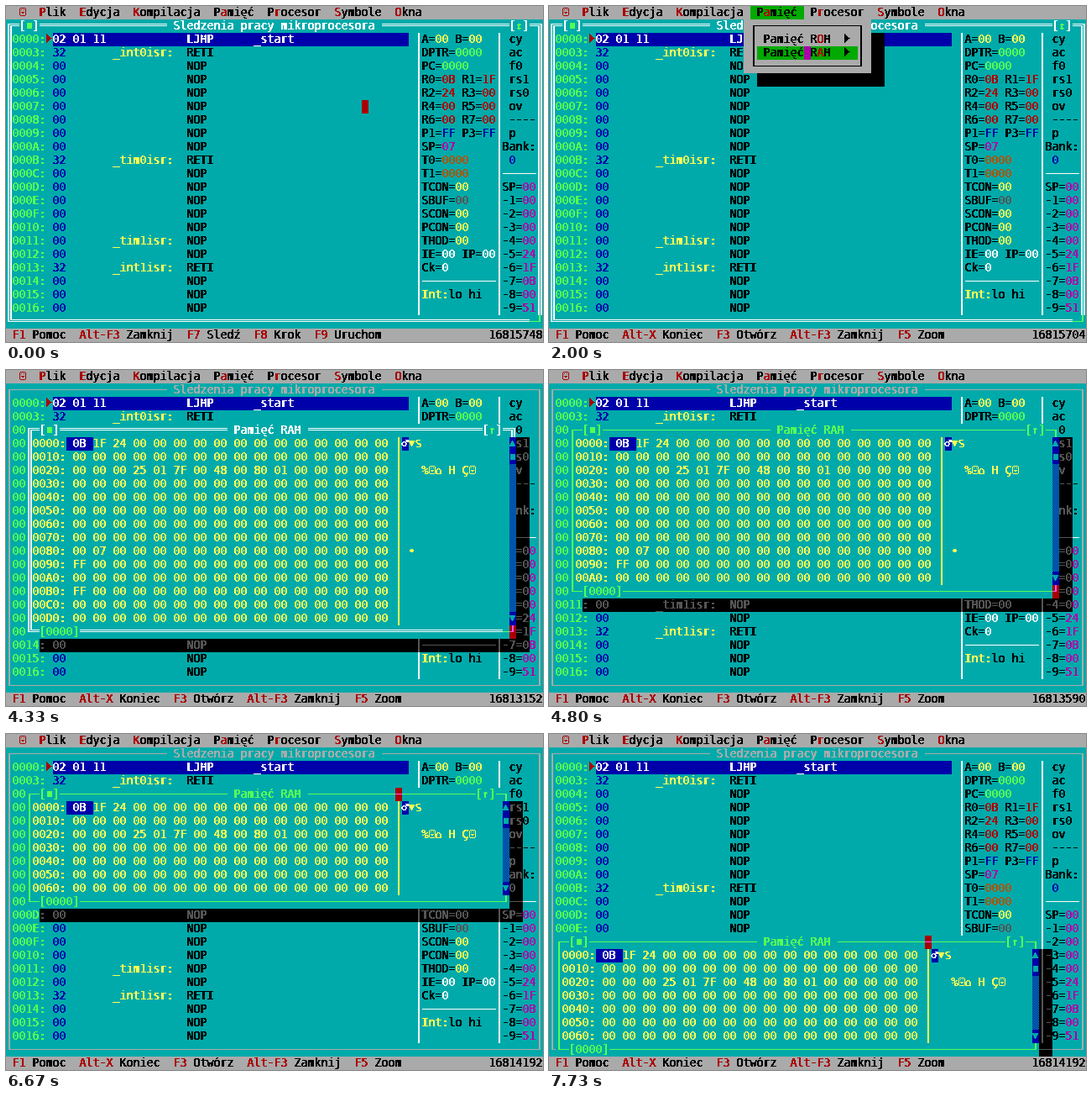
An HTML page with a canvas that plays this animation: 640 by 400 pixels, repeating every 8 s.

```html
<!DOCTYPE html>
<html lang="pl">
<head>
<meta charset="utf-8">
<title>Text-mode debugger</title>
<style>
html, body { margin: 0; width: 100%; height: 100%; overflow: hidden; background: #0aa; }
canvas { display: block; }
</style>
</head>
<body>
<canvas id="screen" width="640" height="400"></canvas>
<script>
const COLS = 80, ROWS = 25, CELL_W = 8, CELL_H = 16, LOOP = 8000, TICK = 1000 / 15;
const BLACK = 0, BLUE = 1, GREEN = 2, CYAN = 3, RED = 4, MAGENTA = 5, BROWN = 6, GREY = 7,
      DARK = 8, LIME = 10, YELLOW = 14, WHITE = 15;

const range = n => [...Array(n).keys()];
const hex = (n, digits) => n.toString(16).toUpperCase().padStart(digits, '0');

// Colour bits: intensity, red, green, blue
const PALETTE = range(16).map(c => {
  const channel = bit => (c >> bit & 1) * 170 + (c >> 3) * 85;
  return c === BROWN ? '#a50' : `rgb(${channel(2)},${channel(1)},${channel(0)})`;
});

// ---- Glyphs: lists of rectangles [x, y, w, h] inside a cell ----
const elbow = (x, y, right, down) => [
  right ? [x, y, CELL_W - x, 1] : [0, y, x + 2, 1],
  down ? [x, y, 2, CELL_H - y] : [x, 0, 2, y + 1]
];
const doubleElbow = (right, down) => [
  ...elbow(right ? 2 : 5, down ? 5 : 7, right, down),
  ...elbow(right ? 5 : 2, down ? 7 : 5, right, down)
];
const taper = i => 3 - Math.ceil(i / 2);
const zeroInset = i => Math.max(0, 2 - Math.min(i, 9 - i));

const glyphs = {
  '─': [[0, 7, 8, 1]],
  '│': [[3, 0, 2, 16]],
  '═': [5, 7].map(y => [0, y, 8, 1]),
  '║': [2, 5].map(x => [x, 0, 2, 16]),
  '■': [[1, 4, 6, 7]],
  '►': range(11).map(i => [0, 1 + i, Math.floor(7 - 1.2 * Math.abs(5 - i)), 1]),
  '▲': range(7).map(i => [taper(i), 4 + i, 7 - 2 * taper(i), 1]),
  '▼': range(7).map(i => [taper(i), 10 - i, 7 - 2 * taper(i), 1]),
  '▒': range(64).map(i => [i % 4 * 2 + 1 - (i >> 2) % 2, i >> 2, 1, 1]),
  '0': [[3, 6, 1, 2], ...range(10).flatMap(i =>
    [zeroInset(i), 5 - zeroInset(i)].map(x => [x, 2 + i, 2, 1]))],
  '☺': [...[2, 11].map(y => [1, y, 6, 1]), ...[0, 7].map(x => [x, 3, 1, 8]),
        ...[2, 5].map(x => [x, 4, 1, 1]), ...[0, 1].map(i => [2 + i, 7 + i, 4 - 2 * i, 1])]
};
[...'┌┐└┘'].forEach((ch, i) => { glyphs[ch] = elbow(3, 7, i % 2 === 0, i < 2); });
[...'╔╗╚╝'].forEach((ch, i) => { glyphs[ch] = doubleElbow(i % 2 === 0, i < 2); });

const scratch = document.createElement('canvas').getContext('2d', { willReadFrequently: true });
scratch.font = '13.3px "DejaVu Sans Mono", monospace';

// Letters come from the font, snapped to whole pixels with two-pixel-wide stems
function glyph(ch) {
  if (!glyphs[ch]) {
    scratch.clearRect(0, 0, CELL_W, CELL_H);
    scratch.fillText(ch, 0, 12);
    const { data } = scratch.getImageData(0, 0, CELL_W, CELL_H);
    glyphs[ch] = range(CELL_W * CELL_H)
      .filter(i => data[i * 4 + 3] > 135)
      .map(i => [i % CELL_W - 1, Math.floor(i / CELL_W), 2, 1]);
  }
  return glyphs[ch];
}

// ---- Text screen ----
const cells = range(COLS * ROWS).map(() => ({ ch: ' ', fg: BLACK, bg: CYAN }));
const cellAt = (x, y) => x >= 0 && x < COLS && y >= 0 && y < ROWS ? cells[y * COLS + x] : null;

// Text between tildes takes the "hot" colour
function put(x, y, text, fg, bg = CYAN, hot = fg) {
  text.split('~').forEach((part, i) => {
    for (const ch of part) {
      const cell = cellAt(x++, y);
      if (cell) Object.assign(cell, { ch, fg: i % 2 ? hot : fg, bg });
    }
  });
}

function box(x, y, w, h, double, fg, bg) {
  const [tl, hz, tr, vt, bl, br] = double ? '╔═╗║╚╝' : '┌─┐│└┘';
  put(x, y, tl + hz.repeat(w - 2) + tr, fg, bg);
  for (let r = 1; r < h - 1; r++) put(x, y + r, vt + ' '.repeat(w - 2) + vt, fg, bg);
  put(x, y + h - 1, bl + hz.repeat(w - 2) + br, fg, bg);
}

function shadow(x, y, w, h) {
  const dim = (cx, cy) => {
    const cell = cellAt(cx, cy);
    if (cell) Object.assign(cell, { fg: DARK, bg: BLACK });
  };
  for (let r = 1; r < h; r++) { dim(x + w, y + r); dim(x + w + 1, y + r); }
  for (let c = 2; c < w + 2; c++) dim(x + c, y + h);
}

function openWindow(x, y, w, h, title, zoomIcon, state) {
  const colour = { active: WHITE, passive: GREY, dragged: LIME }[state];
  box(x, y, w, h, state === 'active', colour, CYAN);
  put(x + Math.floor((w - title.length) / 2) - 1, y, ` ${title} `, colour);
  if (state === 'passive') return;
  put(x + 2, y, '[~■~]', colour, CYAN, LIME);
  put(x + w - 5, y, `[~${zoomIcon}~]`, colour, CYAN, LIME);
  put(x + w - 2, y + h - 1, '─┘', LIME);
}

function popup(x, y, w, items, selected) {
  const h = items.length + 2;
  for (let r = 0; r < h; r++) put(x, y + r, ' '.repeat(w), BLACK, GREY);
  box(x + 1, y, w - 2, h, false, BLACK, GREY);
  items.forEach((item, i) => {
    const bg = i === selected ? GREEN : GREY;
    put(x + 2, y + 1 + i, ' '.repeat(w - 4), BLACK, bg);
    put(x + 3, y + 1 + i, item, BLACK, bg, RED);
  });
  shadow(x, y, w, h);
}

// ---- Tracer window ----
const INTERRUPTS = { '0003': '_int0isr:', '000B': '_tim0isr:', '0011': '_tim1isr:', '0013': '_int1isr:' };
const REGISTERS = [
  ['A=00 B=00', YELLOW], ['DPTR=0000', LIME], ['PC=0000', LIME],
  ['R0=0B R1=1F', RED], ['R2=24 R3=00', RED], ['R4=00 R5=00', RED], ['R6=00 R7=00', RED],
  ['P1=FF P3=FF', BLUE], ['SP=07', MAGENTA], ['T0=0000', BROWN], ['T1=0000', BROWN],
  ['TCON=00', YELLOW], ['SBUF=00', DARK], ['SCON=00', YELLOW], ['PCON=00', YELLOW],
  ['TMOD=00', YELLOW], ['IE=00 IP=00', WHITE], ['Ck=0', WHITE]
];
const FLAGS = 'cy ac f0 rs1 rs0 ov ---- p'.split(' ');
const STACK = '00 00 00 00 00 24 1F 0B 00 51'.split(' ');

function drawTracer(state) {
  openWindow(0, 1, 80, 23, 'Śledzenia pracy mikroprocesora', '↕', state);
  put(1, 2, '0000:~►~', LIME, CYAN, RED);
  put(7, 2, '02 01 11            LJMP      _start'.padEnd(53), WHITE, BLUE);
  for (let row = 3; row < 23; row++) {
    const address = hex(row, 4), label = INTERRUPTS[address] || '';
    const returns = label && label !== '_tim1isr:';
    put(1, row, address + ':', LIME);
    put(7, row, returns ? '32' : '00', BLUE);
    put(16, row, label, YELLOW);
    put(27, row, returns ? 'RETI' : 'NOP', BLACK);
  }
  for (let row = 2; row < 23; row++) {
    put(61, row, '│', WHITE);
    put(73, row, '│', WHITE);
  }
  const values = (x, y, text, colour) =>
    put(x, y, text.replace(/=(\w+)/g, '=~$1~'), BLACK, CYAN, colour);
  REGISTERS.forEach(([text, colour], i) => values(62, 2 + i, text, colour));
  put(62, 20, '─'.repeat(11), WHITE);
  put(62, 21, '~Int:~lo hi', BLACK, CYAN, YELLOW);
  FLAGS.forEach((flag, i) => put(75, 2 + i, flag, BLACK));
  put(74, 10, 'Bank:', BLACK);
  put(75, 11, '0', BLUE);
  put(74, 12, '─────', WHITE);
  STACK.forEach((value, i) => values(74, 13 + i, `${i ? '-' + i : 'SP'}=${value}`, MAGENTA));
}

// ---- Memory window ----
const MEMORY = {
  '0000': '0B 1F 24', '0020': '00 00 00 25 01 7F 00 48 00 80 01',
  '0080': '00 07', '0090': 'FF', '00B0': 'FF'
};
const SYMBOLS = { '00': ' ', '01': '☺', '07': '•', '0B': '♂', '1F': '▼', '7F': '⌂', '80': 'Ç', 'FF': ' ' };
const symbol = byte => SYMBOLS[byte] || String.fromCharCode(parseInt(byte, 16));

function drawMemory({ x, y, w, h, dragged }) {
  openWindow(x, y, w, h, 'Pamięć RAM', '↑', dragged ? 'dragged' : 'active');
  put(x + 2, y + h - 1, '[0000]', LIME);
  for (let r = 0; r < h - 2; r++) {
    const row = y + 1 + r, address = hex(r * 16, 4);
    const known = (MEMORY[address] || '00').split(' ');
    const bytes = range(16).map(i => known[i] || '00');
    put(x + 1, row, `${address}: ${bytes.join(' ')}`, YELLOW);
    put(x + 55, row, '│' + bytes.map(symbol).join(''), YELLOW);
    put(x + w - 1, row, r === 0 ? '▲' : r === h - 3 ? '▼' : r === 1 ? '■' : '▒', CYAN, BLUE);
  }
  put(x + 6, y + 1, ' 0B ', WHITE, BLUE);
  put(x + 56, y + 1, '♂', WHITE, BLUE);
  shadow(x, y, w, h);
}

// ---- Story, in ticks of 1/15 s ----
const MENU = '  ~☺~  ~P~lik  ~E~dycja  ~K~ompilacja  P~a~mięć  P~r~ocesor  ~S~ymbole  ~O~kna';
const TRACER_KEYS = ' ~F1~ Pomoc  ~Alt-F3~ Zamknij  ~F7~ Śledź  ~F8~ Krok  ~F9~ Uruchom';
const GENERAL_KEYS = ' ~F1~ Pomoc  ~Alt-X~ Koniec  ~F3~ Otwórz  ~Alt-F3~ Zamknij  ~F5~ Zoom';

const MENU_OPEN = 22, ITEM_LIT = 24, SUBMENU_OPEN = 36, MEMORY_OPEN = 53,
      RESIZE_START = 69, RESIZE_END = 86, MOVE_START = 99;

// Mouse strokes: start tick, end tick, column and row reached
const STROKES = [
  [7, 9, 56, 8], [9, 15, 32, 1], [17, 18, 33, 0], [26, 30, 38, 3], [41, 46, 40, 8],
  [MEMORY_OPEN, 62, 74, 18], [64, 65, 75, 19], [RESIZE_START, 77, 74, 12],
  [85, 92, 59, 5], [94, 95, 58, 4], [100, 106, 57, 10], [106, 110, 56, 13],
  [111, 112, 56, 14], [115, 116, 56, 15]
];

function mouseAt(tick) {
  let x = 53, y = 7;
  for (const [start, end, toX, toY] of STROKES) {
    const k = Math.min(1, Math.max(0, (tick - start) / (end - start)));
    x += (toX - x) * k;
    y += (toY - y) * k;
  }
  return { x: Math.round(x), y: Math.round(y) };
}

function memoryWindowAt(tick, mouse) {
  if (tick < MEMORY_OPEN) return null;
  if (tick < RESIZE_START) return { x: 3, y: 4, w: 73, h: 16 };
  if (tick < RESIZE_END) return { x: 3, y: 4, w: mouse.x - 2, h: mouse.y - 3, dragged: true };
  if (tick < MOVE_START) return { x: 3, y: 4, w: 72, h: 9 };
  return { x: mouse.x - 55, y: mouse.y, w: 72, h: 9, dragged: true };
}

function freeMemory(tick, memory) {
  if (memory) return 16815488 - 2 * memory.w * memory.h;
  return 16815748 - (tick >= MENU_OPEN ? 44 : 0) - (tick >= SUBMENU_OPEN ? 44 : 0);
}

function compose(tick) {
  const mouse = mouseAt(tick);
  const memory = memoryWindowAt(tick, mouse);

  drawTracer(memory ? 'passive' : 'active');
  if (memory) drawMemory(memory);

  for (const row of [0, 24]) put(0, row, ' '.repeat(COLS), BLACK, GREY);
  put(0, 0, MENU, BLACK, GREY, RED);
  put(0, 24, tick < MENU_OPEN ? TRACER_KEYS : GENERAL_KEYS, BLACK, GREY, RED);
  put(72, 24, String(freeMemory(tick, memory)), BLACK, GREY);

  if (tick >= MENU_OPEN && !memory) {
    put(30, 0, ' P~a~mięć ', BLACK, GREEN, RED);
    popup(29, 1, 19, ['Pamięć R~O~M  ►', 'Pamięć R~A~M  ►'], tick >= ITEM_LIT ? 1 : -1);
    if (tick >= SUBMENU_OPEN) {
      popup(31, 4, 17, ['~Z~aładuj...', 'Z~a~pisz...', '~W~ypełnij...', '~P~okaż'], 3);
    }
  }

  // The mouse pointer inverts the colours of its cell
  const pointed = cellAt(mouse.x, mouse.y);
  pointed.fg ^= 7;
  pointed.bg ^= 7;
}

const ctx = document.getElementById('screen').getContext('2d');

function paint() {
  cells.forEach(({ bg }, i) => {
    ctx.fillStyle = PALETTE[bg];
    ctx.fillRect(i % COLS * CELL_W, Math.floor(i / COLS) * CELL_H, CELL_W, CELL_H);
  });
  cells.forEach(({ ch, fg }, i) => {
    const x = i % COLS * CELL_W, y = Math.floor(i / COLS) * CELL_H;
    ctx.fillStyle = PALETTE[fg];
    for (const [dx, dy, w, h] of glyph(ch)) ctx.fillRect(x + dx, y + dy, w, h);
  });
}

let shownTick = -1;
function animate() {
  const tick = Math.floor((performance.now() % LOOP + 4) / TICK) % 120;
  if (tick !== shownTick) {
    shownTick = tick;
    compose(tick);
    paint();
  }
  requestAnimationFrame(animate);
}
animate();
</script>
</body>
</html>
```
